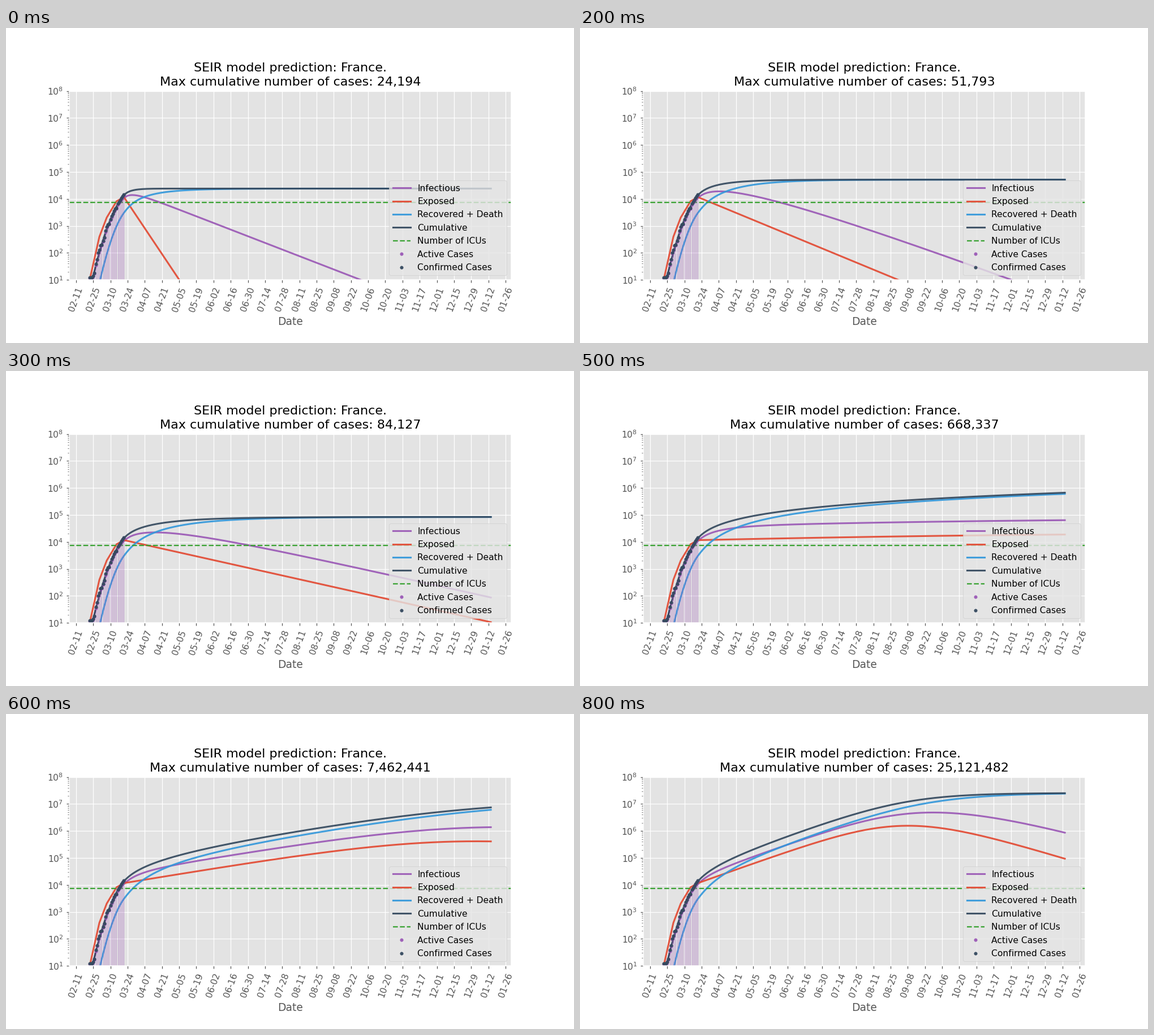
A matplotlib script for the animation above (2000 ms loop, 1004 by 558 pixels).

```python
import numpy as np
import matplotlib.pyplot as plt
from matplotlib.animation import FuncAnimation
from matplotlib.ticker import LogLocator, NullFormatter

W, H, DPI = 1004, 558, 111.6
INTERVAL, FRAMES = 100, 20

PURPLE, RED, BLUE, NAVY, GREEN = "#9b59b6", "#e24a33", "#3498db", "#34495e", "#33a02c"

# Days are counted from 11 February 2020.
EPOCH = np.datetime64("2020-02-11")
FIRST, SPLIT, LAST = 11, 39, 338
POPULATION = 66e6
SIGMA, GAMMA = 0.141, 0.0405         # exposed -> infectious -> recovered
E0, I0, R0 = 11700.0, 10600.0, 3050.0
STEPS = 4                            # integration steps per day

CONFIRMED = np.array([
    12, 12, 12, 14, 18, 38, 57, 100, 130, 191, 204, 285, 377, 653, 949,
    1126, 1209, 1784, 2281, 2876, 3661, 4469, 4499, 6633, 7652, 9043,
    10871, 12612, 14282])
ACTIVE = 0.95 * CONFIRMED

# Cumulative cases reached in each scenario, from strict to loose measures.
TOTALS = np.array([24194, 33058, 51793, 84127, 203706,
                   668337, 7462441, 17306528, 25121482])


def simulate(rate):
    """Run every scenario at once; returns daily E, I, R arrays."""
    e, i, r = (np.full(len(rate), v) for v in (E0, I0, R0))
    out = [(e, i, r)]
    dt = 1 / STEPS
    for n in range(1, (LAST - SPLIT) * STEPS + 1):
        hit = (e + i + r) / POPULATION
        growth = rate - (rate + SIGMA) * hit
        e_next = e * np.exp(growth * dt)
        inflow = SIGMA * (e + e_next) / 2 * dt
        healed = GAMMA * (i + inflow / 2) * dt / (1 + GAMMA * dt / 2)
        e, i, r = e_next, i + inflow - healed, r + healed
        if n % STEPS == 0:
            out.append((e, i, r))
    return np.array(out).transpose(1, 2, 0)


def fit_rates(totals):
    """Bisect the initial growth rate that leads to each total."""
    lo, hi = np.full(len(totals), -0.25), np.full(len(totals), 0.08)
    for _ in range(30):
        mid = (lo + hi) / 2
        _, i, r = simulate(mid)
        low = (i + r)[:, -1] < totals
        lo, hi = np.where(low, mid, lo), np.where(low, hi, mid)
    return (lo + hi) / 2


def log_curve(x, days, exponents):
    return 10 ** np.polyval(np.polyfit(days, exponents, 2), x)


# Shared history up to the day the scenarios part.
past = np.arange(FIRST, SPLIT)
past_e = 10 ** np.interp(past, [11, 19, 25, 33, 39],
                         np.log10([9.5, 395, 2040, 8200, E0]))
past_c = log_curve(past, [13.5, 24, 39], [1.05, 2.75, np.log10(I0 + R0)])
past_r = log_curve(past, [19.6, 28, 39], [1, 2.39, np.log10(R0)])

sim_e, sim_i, sim_r = simulate(fit_rates(TOTALS))
days = np.arange(FIRST, LAST + 1)


def joined(before, after):
    return np.hstack([np.tile(before, (len(TOTALS), 1)), after])


curves = [
    joined(np.maximum(past_c - past_r, 1e-3), sim_i),
    joined(past_e, sim_e),
    joined(past_r, sim_r),
    joined(past_c, sim_i + sim_r),
]

plt.style.use("ggplot")
plt.rcParams["font.family"] = "DejaVu Sans"
fig = plt.figure(figsize=((W + 1e-6) / DPI, (H + 1e-6) / DPI), dpi=DPI,
                 facecolor="white")
ax = fig.add_axes([112.2 / W, 111.8 / H, 780.3 / W, 334.6 / H],
                  facecolor="#e3e3e3")
ax.set_yscale("log")
pad = 0.05 * (LAST - FIRST)
ax.set_xlim(FIRST - pad, LAST + pad)
ax.set_ylim(10, 1e8)

names = ["Infectious", "Exposed", "Recovered + Death", "Cumulative"]
lines = [ax.plot([], [], color=c, lw=2, alpha=0.92, label=n)[0]
         for n, c in zip(names, (PURPLE, RED, BLUE, NAVY))]
ax.axhline(7500, color=GREEN, lw=1.5, ls="--", alpha=0.95,
           label="Number of ICUs")

seen = np.arange(FIRST, SPLIT + 1)
ax.vlines(seen, 1, ACTIVE, color=PURPLE, lw=0.6, alpha=0.55)
for values, color, name in ((ACTIVE, PURPLE, "Active Cases"),
                            (CONFIRMED, NAVY, "Confirmed Cases")):
    ax.plot(seen, values, "o", color=color, ms=3.4, mew=0.5,
            alpha=0.95, label=name)

ticks = np.arange(0, 351, 14)
ax.set_xticks(ticks, [str(EPOCH + int(d))[5:] for d in ticks], rotation=70)
ax.yaxis.set_major_locator(LogLocator(numticks=20))
ax.yaxis.set_minor_locator(LogLocator(subs=np.arange(2, 10), numticks=20))
ax.yaxis.set_minor_formatter(NullFormatter())
ax.set_xlabel("Date")
title = ax.set_title("", linespacing=1.32)
ax.legend(loc="lower right", labelspacing=0.545)


def draw(frame):
    k = min(frame, len(TOTALS) - 1)
    for line, data in zip(lines, curves):
        line.set_data(days, data[k])
    title.set_text("SEIR model prediction: France.\n"
                   f"Max cumulative number of cases: {TOTALS[k]:,}")
    return [*lines, title]


anim = FuncAnimation(fig, draw, frames=FRAMES, interval=INTERVAL,
                     repeat=True, repeat_delay=0, blit=False)
plt.show()
```
